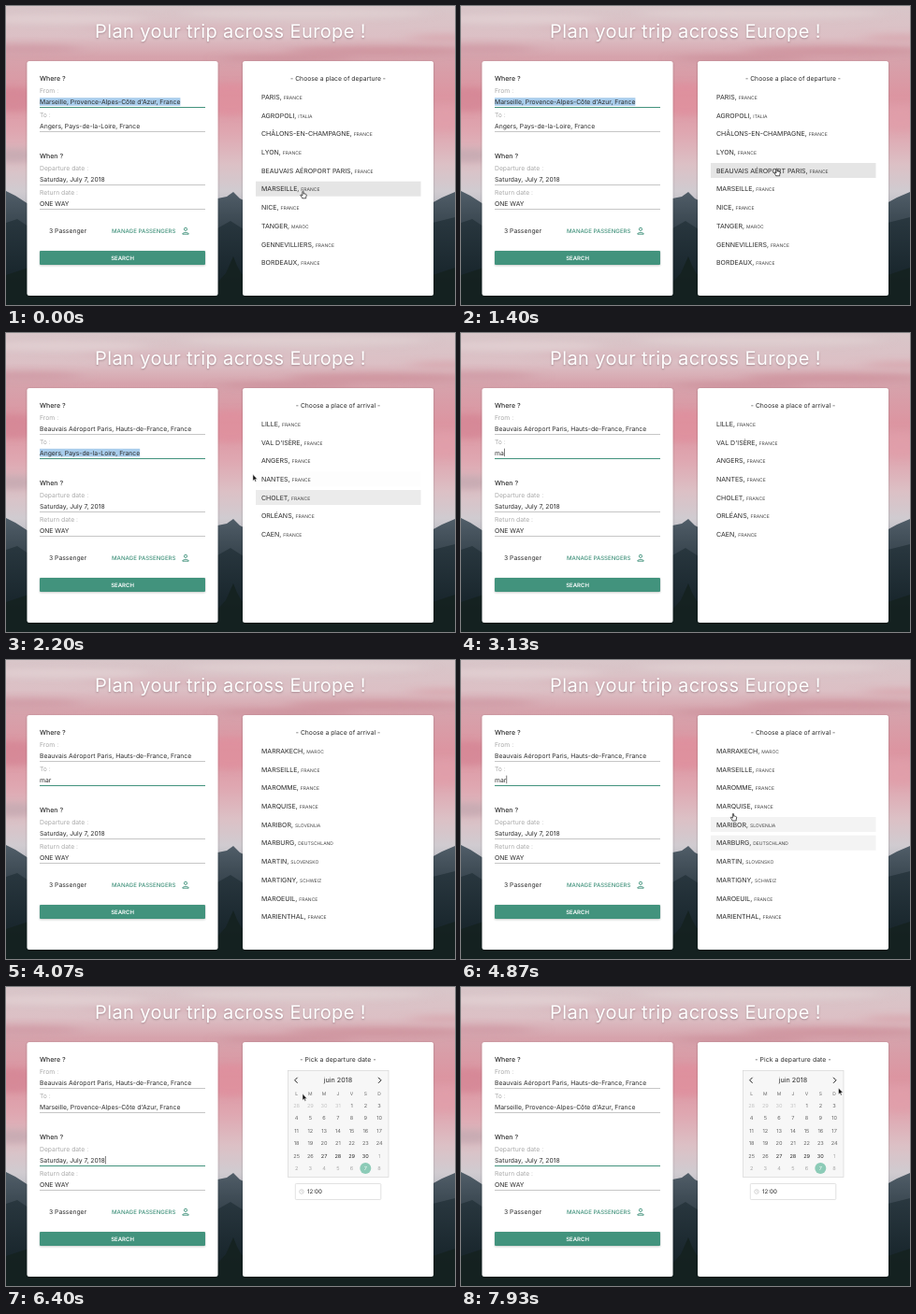
Write an HTML page that moves like this. It is 480 px wide and 320 px high and loops after 8000 ms.

```html
<!DOCTYPE html>
<html lang="en">
<head>
<meta charset="utf-8">
<title>Trip planner</title>
<style>
html, body { margin: 0; width: 100%; height: 100%; overflow: hidden; background: #14232a; }
svg { display: block; width: 480px; height: 320px; }
text { font: 400 6.8px Inter, "Open Sans", sans-serif; fill: #2b2b2b; white-space: pre; text-rendering: geometricPrecision; }
.title { font-size: 20px; letter-spacing: .4px; fill: #fff; text-shadow: 0 1px 2px rgba(90,60,70,.4); }
.mid { text-anchor: middle; }
.head { font-weight: 500; font-size: 7px; }
.label { fill: #a9a9a9; }
.name { font-size: 7px; }
.land { font-size: 5px; fill: #444; }
.cal { font-size: 5.6px; }
</style>
</head>
<body>
<svg id="stage" viewBox="0 0 480 320" xmlns="http://www.w3.org/2000/svg">
  <defs>
    <linearGradient id="sky" x2="0" y2="1">
      <stop offset="0" stop-color="#d8c6c9"/>
      <stop offset=".1" stop-color="#dcc0c5"/>
      <stop offset=".17" stop-color="#d6a3ac"/>
      <stop offset=".3" stop-color="#dc95a1"/>
      <stop offset=".42" stop-color="#dfa6b0"/>
      <stop offset=".53" stop-color="#dcc0c5"/>
      <stop offset=".62" stop-color="#d0cbd0"/>
      <stop offset=".7" stop-color="#b4b8c0"/>
    </linearGradient>
    <linearGradient id="far" gradientUnits="userSpaceOnUse" x1="0" y1="195" x2="0" y2="265">
      <stop offset="0" stop-color="#53606b"/><stop offset="1" stop-color="#25323a"/>
    </linearGradient>
    <linearGradient id="near" gradientUnits="userSpaceOnUse" x1="0" y1="225" x2="0" y2="310">
      <stop offset="0" stop-color="#2a3840"/><stop offset="1" stop-color="#132026"/>
    </linearGradient>
    <filter id="soft" x="-30%" y="-100%" width="160%" height="300%"><feGaussianBlur stdDeviation="10 3"/></filter>
    <filter id="shade" x="-5%" y="-10%" width="110%" height="130%"><feDropShadow dx="0" dy=".7" stdDeviation=".8" flood-opacity=".25"/></filter>
  </defs>
  <rect width="480" height="320" fill="url(#sky)"/>
  <g id="clouds" filter="url(#soft)"></g>
  <path fill="url(#far)" d="M0 198L10 203L24 212L120 232L226 206L236 204L243 199L250 206L262 212L360 235L455 211L466 205L480 199V320H0Z"/>
  <path fill="url(#near)" d="M0 232L12 228L24 236L120 262L226 238L240 230L254 239L360 266L456 232L480 226V320H0Z"/>
  <path fill="#14211f" d="M0 288L24 280L226 296L235 286L239 277L243 268L247 278L252 287L456 288L480 280V320H0Z" opacity=".85"/>
  <g filter="url(#shade)" fill="#fff">
    <rect x="22.5" y="59" width="204" height="251" rx="2.5"/>
    <rect x="253" y="59" width="204" height="251" rx="2.5"/>
  </g>
  <g id="form"></g>
  <g id="side"></g>
  <g id="hand" stroke="#111" stroke-width=".7" stroke-linejoin="round">
    <path fill="#fff" d="M-.6 .5Q0-.3 .6.5V3L1.5 2.8L2.4 3.2L3.2 3.4Q3.8 3.6 3.7 4.6L3.2 6.6V7.8H-.8L-1.5 6.4L-2.7 4.5Q-2.5 3.6-1.6 4.2L-.6 5Z"/>
  </g>
  <path id="arrow" fill="#111" stroke="#fff" stroke-width=".5" d="M0 0V7L1.6 5.5L2.6 7.9L3.7 7.4L2.7 5.1H4.8Z"/>
</svg>
<script>
const LOOP = 8000;
const NS = "http://www.w3.org/2000/svg";
const $ = id => document.getElementById(id);
const GREEN = "#43937d";

function add(parent, tag, attrs = {}, str) {
  const el = document.createElementNS(NS, tag);
  for (const k in attrs) el.setAttribute(k, attrs[k]);
  if (str !== undefined) el.textContent = str;
  parent.appendChild(el);
  return el;
}
const text = (parent, x, y, str, cls = "", more = {}) => add(parent, "text", { x, y, class: cls, ...more }, str);
const show = (el, on) => el.setAttribute("visibility", on ? "visible" : "hidden");

// cx, cy, rx, ry, colour
[
  [60, 14, 90, 5, "#e3d2d4"], [320, 8, 130, 6, "#e0d0d2"], [190, 24, 110, 4, "#d9b5bb"],
  [20, 46, 60, 5, "#cf9aa4"], [400, 48, 100, 5, "#cd909b"], [300, 56, 70, 3, "#c98c97"],
  [470, 34, 40, 4, "#d7a4ac"], [240, 100, 40, 18, "#df8f9c"], [470, 120, 30, 14, "#e09eaa"],
  [8, 100, 30, 14, "#d48593"], [8, 160, 30, 8, "#c2a7af"]
].forEach(([cx, cy, rx, ry, fill]) => add($("clouds"), "ellipse", { cx, cy, rx, ry, fill, opacity: .75 }));

// Left panel
const form = $("form");
text(form, 240, 34, "Plan your trip across Europe !", "title mid");
text(form, 36, 80, "Where ?", "head");
text(form, 36, 163, "When ?", "head");

function field(label, y) {
  text(form, 36, y - 12, label, "label");
  const mark = add(form, "rect", { x: 36, y: y - 6.8, height: 8.6, fill: "#a9cdec" });
  const value = text(form, 36, y, "");
  const line = add(form, "rect", { x: 36, y: Math.round(y + 3.4), width: 177, height: 1 });
  const caret = add(form, "rect", { y: y - 7, width: .6, height: 8.5, fill: "#222" });
  return (str, focus, selected, blink) => {
    if (value.textContent !== str) value.textContent = str;
    const w = value.getComputedTextLength();
    mark.setAttribute("width", selected ? w : 0);
    line.setAttribute("fill", focus ? GREEN : "#c6c6c6");
    caret.setAttribute("x", 36.2 + w);
    show(caret, blink);
  };
}
const from = field("From :", 105);
const to = field("To :", 130.6);
const leave = field("Departure date :", 188);
const back = field("Return date :", 213.6);

text(form, 46, 243.2, "3 Passenger");
text(form, 113, 243.2, "MANAGE PASSENGERS", "", { style: "font-size:6.1px;font-weight:500;fill:" + GREEN });
const icon = add(form, "g", { fill: "none", stroke: GREEN, "stroke-width": .9 });
add(icon, "circle", { cx: 192, cy: 238.8, r: 1.6 });
add(icon, "path", { d: "M188.8 244.2V243.4Q192 241 195.2 243.4V244.2Z" });
add(form, "rect", { x: 36, y: 262, width: 177, height: 15, rx: 1, fill: GREEN, filter: "url(#shade)" });
text(form, 124.5, 272, "SEARCH", "mid", { style: "font-size:6px;font-weight:600;fill:#fff" });

// Right panel
const ROW = 19.7, rowY = i => 97.4 + ROW * i;
const side = $("side");

function places(kind, list) {
  const g = add(side, "g");
  text(g, 355, 79.7, `- Choose a place of ${kind} -`, "mid");
  const bars = list.split("|").map((item, i) => {
    const [name, land = "FRANCE"] = item.split("/");
    const bar = add(g, "rect", { x: 267, y: rowY(i) - 8.2, width: 176.5, height: 16, fill: "#e5e5e5" });
    const line = text(g, 273, rowY(i) + 2.5, "");
    add(line, "tspan", { class: "name" }, name + ", ");
    add(line, "tspan", { class: "land" }, land);
    return bar;
  });
  return { g, bars };
}
const views = [
  places("departure", "PARIS|AGROPOLI/ITALIA|CHÂLONS-EN-CHAMPAGNE|LYON|BEAUVAIS AÉROPORT PARIS|MARSEILLE|NICE|TANGER/MAROC|GENNEVILLIERS|BORDEAUX"),
  places("arrival", "LILLE|VAL D'ISÈRE|ANGERS|NANTES|CHOLET|ORLÉANS|CAEN"),
  places("arrival", "MARRAKECH/MAROC|MARSEILLE|MAROMME|MARQUISE|MARIBOR/SLOVENIJA|MARBURG/DEUTSCHLAND|MARTIN/SLOVENSKO|MARTIGNY/SCHWEIZ|MAROEUIL|MARIENTHAL"),
  calendar()
];

function calendar() {
  const g = add(side, "g");
  text(g, 355, 79.7, "- Pick a departure date -", "mid", { style: "letter-spacing:.1px" });
  add(g, "rect", { x: 301.5, y: 89.5, width: 107.5, height: 114, fill: "#f7f7f7", stroke: "#d6d6d6", "stroke-width": .7 });
  text(g, 355, 102, "juin 2018", "mid", { style: "font-size:7.2px" });
  add(g, "path", { d: "M311.6 96.8L308.6 99.8L311.6 102.8M398 96.8L401 99.8L398 102.8", fill: "none", stroke: "#222", "stroke-width": 1 });
  const colX = c => 310.6 + 14.75 * c;
  [..."LMMJVSD"].forEach((d, c) => text(g, colX(c), 115.7, d, "cal mid", { style: "fill:#666;font-size:5px" }));
  add(g, "circle", { cx: 384.3, cy: 193.9, r: 6, fill: "#8ccbb7" });
  for (let i = 0; i < 42; i++) {
    const n = i - 3;
    const day = n < 1 ? n + 31 : n > 30 ? n - 30 : n;
    const fill = n === 37 ? "#fff" : n < 1 ? "#c4c4c4" : n > 30 ? "#a9a9a9" : n > 26 ? "#2b2b2b" : "#666";
    text(g, colX(i % 7), 129 + 13.4 * Math.floor(i / 7), day, "cal mid", { style: "fill:" + fill });
  }
  add(g, "rect", { x: 309.3, y: 210.5, width: 91.5, height: 17, rx: 1, fill: "#fff", stroke: "#d6d6d6", "stroke-width": .7 });
  add(g, "circle", { cx: 316, cy: 219, r: 2.3, fill: "none", stroke: "#b9b9b9", "stroke-width": .6 });
  add(g, "path", { d: "M316 217.5V219.1H317.2", fill: "none", stroke: "#b9b9b9", "stroke-width": .5 });
  text(g, 322, 221.2, "12:00", "", { style: "font-size:6.2px" });
  return { g, bars: [] };
}

// Pointer tip: time, x, y
const path = [
  [0, 317.5, 198], [70, 317.5, 198], [600, 322, 191], [1000, 322, 191], [1400, 337.5, 174],
  [1870, 338, 174], [2090, 336, 172], [2200, 264, 151], [2530, 232, 263], [4470, 232, 263],
  [4800, 286, 172], [5000, 300, 150], [5270, 300, 150], [5650, 317, 114.3], [7070, 317, 114.3],
  [7500, 375, 120], [7870, 404, 111], [7930, 403.5, 108], [8000, 403.5, 108]
];
function tip(t) {
  const i = Math.max(1, path.findIndex(p => p[0] >= t));
  const [t0, x0, y0] = path[i - 1], [t1, x1, y1] = path[i];
  const k = (t - t0) / (t1 - t0);
  return [x0 + (x1 - x0) * k, y0 + (y1 - y0) * k];
}
const hidden = t => t >= 2870 && t < 4470;
function rowAt(t) {
  const [x, y] = tip(t);
  if (hidden(t) || x < 267 || x > 443) return -1;
  const i = Math.round((y - rowY(0)) / ROW);
  return Math.abs(y - rowY(i)) < 8.2 ? i : -1;
}
// Rows light up and fade with a short lag
function glow(i, t) {
  let sum = 0;
  for (let k = 0; k < 24; k++) sum += rowAt(Math.max(0, t - 65 - k * 5)) === i;
  return sum / 24;
}

const PICK = 1870, CLEAR = 2870, FOUND = 3870, DONE = 5800;
const HOME = "Marseille, Provence-Alpes-Côte d'Azur, France";

function draw(t) {
  const typing = t >= CLEAR && t < 5600;
  const letters = t < 3070 ? 1 : t < 3270 ? 2 : 3;
  const beat = t < 3330 || Math.floor((t - 3330) / 530) % 2 === 0;
  const dest = t < CLEAR ? "Angers, Pays-de-la-Loire, France" : t < DONE ? "mar".slice(0, letters) : HOME;
  const picking = t >= DONE;

  from(t < PICK ? HOME : "Beauvais Aéroport Paris, Hauts-de-France, France", t < PICK, t < PICK, false);
  to(dest, t >= PICK && t < 5600, t >= PICK && t < CLEAR, typing && beat);
  leave("Saturday, July 7, 2018", picking, false, picking && Math.floor((t - 5900) / 490) % 2 !== 0);
  back("ONE WAY", false, false, false);

  const view = t < PICK ? 0 : t < FOUND ? 1 : t < DONE ? 2 : 3;
  views.forEach((v, n) => {
    v.g.setAttribute("display", n === view ? "inline" : "none");
    if (n === view) v.bars.forEach((b, i) => b.setAttribute("opacity", glow(i, t)));
  });

  const [x, y] = tip(t);
  const pointing = t < 5600 && rowAt(t) >= 0;
  for (const id of ["hand", "arrow"]) {
    $(id).setAttribute("transform", `translate(${x} ${y})`);
    show($(id), !hidden(t) && pointing === (id === "hand"));
  }
}

const start = performance.now();
function tick() {
  draw((performance.now() - start) % LOOP);
  requestAnimationFrame(tick);
}
draw(0);
requestAnimationFrame(tick);
</script>
</body>
</html>
```
